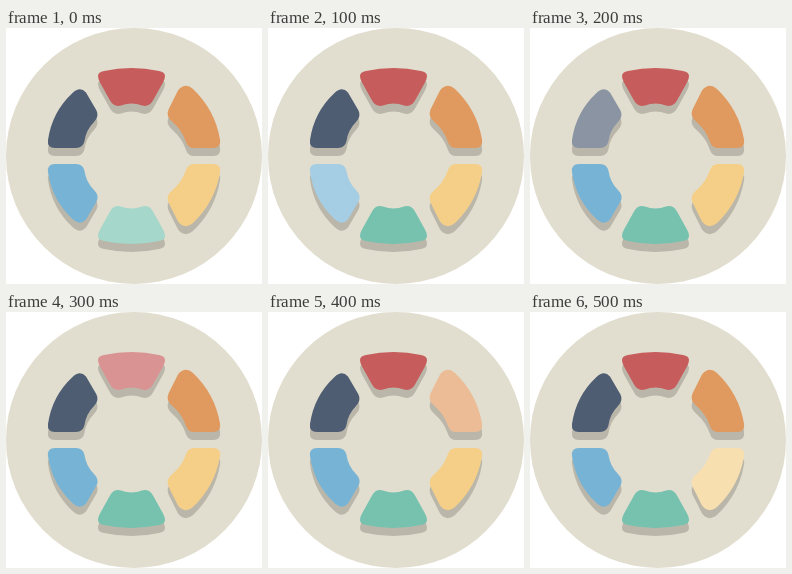
Recreate the animation shown at these times as an HTML page with a canvas. Size 256 by 256 pixels, loop 0.6 s.

```html
<!DOCTYPE html>
<html lang="en">
<head>
<meta charset="utf-8">
<title>Segment loader</title>
<style>
  html, body { margin: 0; width: 100%; height: 100%; overflow: hidden; background: #fff; }
  canvas { display: block; width: 256px; height: 256px; }
</style>
</head>
<body>
<canvas id="stage" width="256" height="256"></canvas>
<script>
const ctx = document.getElementById('stage').getContext('2d');
const STEP = 100;
const SHADOW_DROP = 8;
const GLOW = 0.34;

// Upper half of the ring; the lower half is its mirror image.
const topPath = new Path2D(
  'M92 48 Q92 44 98 43 Q125.5 37 153 43 Q159 44 159 48 Q159 51 157 54.5 ' +
  'L147 72.5 Q143 79.5 136 77.5 Q125.5 73.5 115 77.5 Q108 79.5 104 72.5 ' +
  'L94 54.5 Q92 51 92 48Z');
const rightPath = new Path2D(
  'M172 62.5 Q179 54 187 61 Q209 82 214 111.5 Q215.5 120 207 120 ' +
  'L188 120 Q182 120 180 114 Q176 102 166.5 94 Q159.5 88.5 162.5 81.5 Z');
const leftPath = new Path2D(
  'M80 64.5 Q74 58 66.5 65 Q46 84 42 112 Q41 120 49 120 ' +
  'L70 120 Q77 120 78.5 113 Q80 102 88 94 Q93.5 88.5 90.5 82.5 Z');

// Listed in the order they light up.
const segments = [
  { path: topPath, flip: true, rgb: [118, 194, 175] },
  { path: leftPath, flip: true, rgb: [119, 179, 212] },
  { path: leftPath, flip: false, rgb: [79, 93, 115] },
  { path: topPath, flip: false, rgb: [199, 92, 92] },
  { path: rightPath, flip: false, rgb: [224, 153, 94] },
  { path: rightPath, flip: true, rgb: [245, 207, 135] }
];

const lighten = rgb => rgb.map(v => Math.round(v + (255 - v) * GLOW));

function fillSegment(seg, color, drop) {
  ctx.save();
  ctx.translate(0, drop);
  if (seg.flip) ctx.transform(1, 0, 0, -1, 0, 256);
  ctx.fillStyle = color;
  ctx.fill(seg.path);
  ctx.restore();
}

function draw(time) {
  const active = Math.floor(time / STEP) % segments.length;
  ctx.clearRect(0, 0, 256, 256);
  ctx.fillStyle = '#e1decf';
  ctx.beginPath();
  ctx.arc(128, 128, 128, 0, Math.PI * 2);
  ctx.fill();

  for (const seg of segments) fillSegment(seg, '#bab7aa', SHADOW_DROP);
  segments.forEach((seg, i) => {
    const rgb = i === active ? lighten(seg.rgb) : seg.rgb;
    fillSegment(seg, `rgb(${rgb})`, 0);
  });
}

const start = performance.now();
function tick() {
  draw(performance.now() - start);
  requestAnimationFrame(tick);
}
tick();
</script>
</body>
</html>
```
